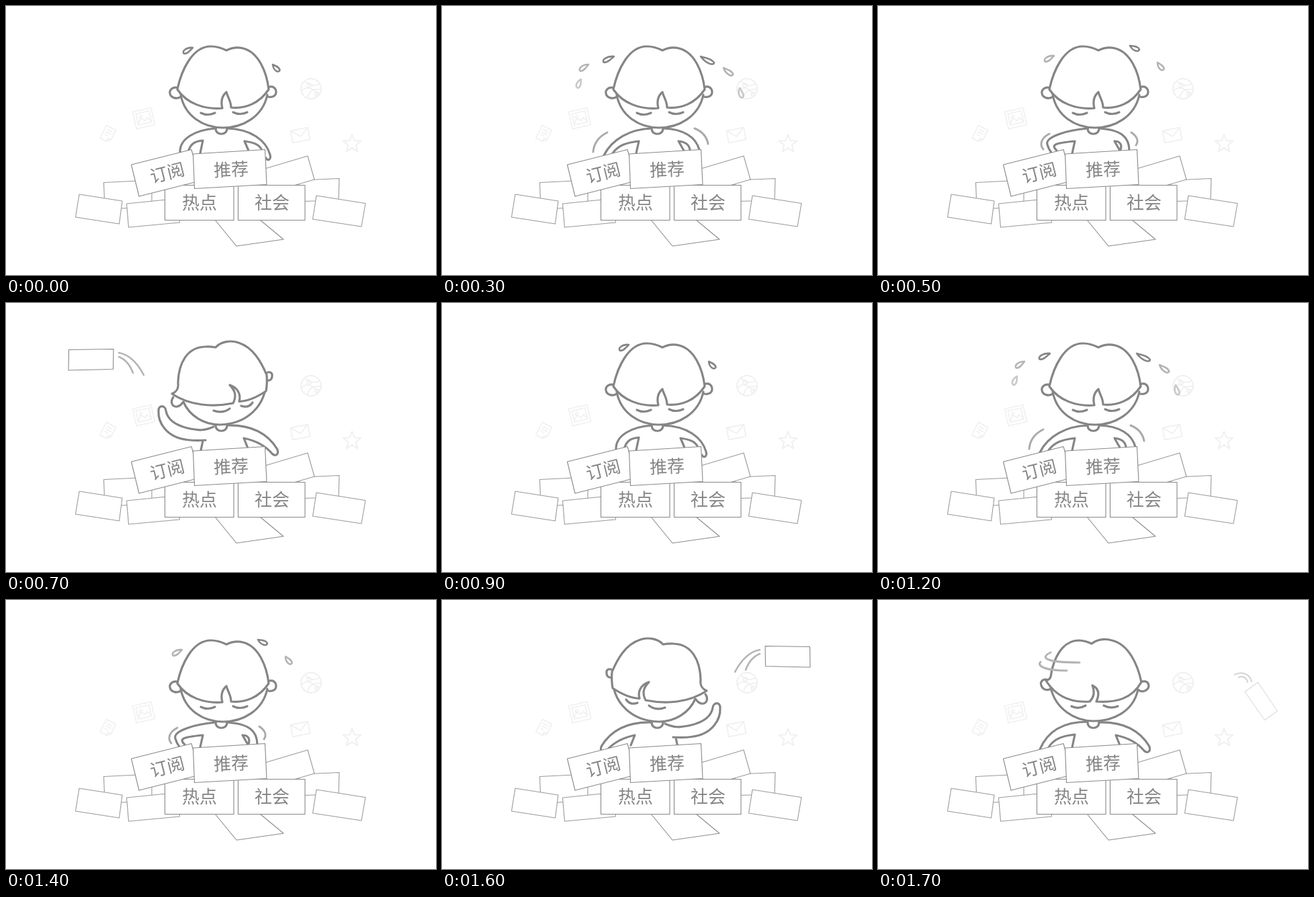
These frames come from a looping animation (640x400 px, 1800 ms). An HTML page with a canvas:

```html
<!DOCTYPE html>
<html lang="zh">
<head>
<meta charset="utf-8">
<title>信息堆</title>
<style>
html, body { margin: 0; width: 100%; height: 100%; overflow: hidden; background: #fff; }
canvas { display: block; width: 640px; height: 400px; }
</style>
</head>
<body>
<canvas id="stage" width="640" height="400"></canvas>
<script>
const ctx = document.getElementById('stage').getContext('2d');
const INK = '#858585', MID = '#b4b4b4', PALE = '#f0f0f0';
const STEP = 100, STEPS = 18;

function stroke(d, color = INK, width = 3.2, fill) {
  const path = new Path2D(d);
  if (fill) { ctx.fillStyle = fill; ctx.fill(path); }
  ctx.strokeStyle = color;
  ctx.lineWidth = width;
  ctx.stroke(path);
}

function at(x, y, degrees, draw) {
  ctx.save();
  ctx.translate(x, y);
  ctx.rotate(degrees * Math.PI / 180);
  draw();
  ctx.restore();
}

function mirrored(draw) {
  ctx.save();
  ctx.translate(641, 0);
  ctx.scale(-1, 1);
  draw();
  ctx.restore();
}

const card = (points, color = '#999') => stroke(`M${points}Z`, color, 1.1, '#fff');

function label(text, x, y, degrees = 0) {
  at(x, y, degrees, () => {
    ctx.fillStyle = '#858585';
    ctx.font = '300 26px "Noto Sans CJK SC", "Noto Sans CJK", sans-serif';
    ctx.textAlign = 'center';
    ctx.textBaseline = 'alphabetic';
    ctx.fillText(text, 0, 9.5);
  });
}

function icons() {
  at(205, 167, -13, () => {
    stroke('M-14 -13H14V13H-14Z M-10 -9H10V8H-10Z', PALE, 1.6);
    stroke('M-10 6L-4 -1L1 4L5 0L10 6 M-4 -5A2 2 0 1 0 -3.9 -5', PALE, 1.6);
  });
  at(152, 190, 27, () => {
    stroke('M-8 -10H8V6L3 11H-8Z M8 6H3V11', PALE, 1.6);
    stroke('M-4 -5H4M-4 -1H4M-4 3H1', PALE, 1.6);
  });
  at(438, 192, -11, () => stroke('M-13 -9H13V9H-13Z M-13 -9L0 2L13 -9', PALE, 1.8));
  at(454, 123, 0, () => {
    stroke('M15 0A15 15 0 1 1 -15 0A15 15 0 1 1 15 0', PALE, 2);
    stroke('M-9 -11C-2 -5 2 -3 13 -7 M-14 3C-7 -4 1 -3 11 10 M-5 14C-4 5 2 0 14 1', PALE, 1.8);
    stroke('M-3 -8A3 3 0 1 0 -2.9 -8 M9 5A3 3 0 1 0 9.1 5', PALE, 1.8);
  });
  at(515, 205, 0, () => {
    const points = Array.from({ length: 10 }, (_, i) => {
      const angle = i * Math.PI / 5 - Math.PI / 2, r = i % 2 ? 6 : 14;
      return `${r * Math.cos(angle)},${r * Math.sin(angle)}`;
    });
    stroke(`M${points.join(' ')}Z`, PALE, 2);
  });
}

function pile() {
  card('145.5,262.5 217,259 217,299 147,302');
  card('179.5,294 258,286 258.5,322 182.5,329');
  card('109,280 173,290 168.5,324 103.5,314');
  card('440,259 496,256.5 495,289 420,291');
  card('370,246.5 449,223 459,258 380,281');
  card('462,282 535,293.5 529,328 456.5,317');
  stroke('M311 318L343 357L413 347L378 318', '#8c8c8c', 1.1);
  card('236.5,266.5 339,266.5 339,318.5 236.5,318.5', '#888');
  card('345.5,266.5 445,266.5 445,318.5 345.5,318.5', '#888');
  card('186.5,236 276,213.5 289,260 198,283', '#888');
  card('278.5,220 385.5,213.5 388,265.5 280.5,271.5', '#888');
  label('订阅', 240, 248, -14);
  label('推荐', 335, 243, -2.5);
  label('热点', 288, 292);
  label('社会', 396, 292);
}

// Each head: ears, face, hair, eyes.
const heads = {
  front: [
    'M257 122C248 119 243 125 244 130C245 137 255 139 260 135M390 121C397 118 402 122 402 128C402 135 393 137 388 134',
    'M260 132C266 164 294 181 323 181C352 181 382 165 389 132',
    'M255 124C261 96 277 60 305 60C315 60 322 63 328 66C336 62 345 61 353 63C376 69 388 98 391 124C377 145 356 153 335 151C335 142 331 138 328 128C320 135 320 144 322 152C295 154 269 145 255 124Z',
    'M290 159Q300 164 311 159M338 158Q348 163 359 158'],
  turned: [
    'M249 140C244 147 247 155 255 154C259 153 261 151 263 148M388 104C393 101 397 104 396 109C396 114 392 116 388 115',
    'M264 147C273 168 295 181 318 181C356 180 388 156 388 110',
    'M247 135C256 131 257 125 256 118C257 90 269 66 296 65Q304 64.5 312 66C320 57 335 55 346 59C368 66 380 88 388 107Q389 120 387 131C372 141 359 146 347 146.5C350 136 345 126 333 122C342 131 343 139 338 149C308 155 274 153 247 135Z',
    'M309 160Q322 165 333 157M350 153Q361 157 367 148'],
  settling: [
    'M254 119C245 116 241 122 243 127C245 134 253 135 257 132M391 122C398 119 403 122 403 128C402 135 393 138 388 134',
    'M257 130C264 162 293 180 321 180C350 180 380 166 387 133',
    'M250 120C259 118 257 111 259 103C266 76 280 60 299 60Q309 60.5 318 65C326 59 337 57 348 60C374 66 387 98 392 122C378 147 354 153 325 151C329 142 330 132 319 127C323 137 321 145 315 151C288 153 266 145 250 120Z',
    'M288 158Q298 163 309 157M336 157Q346 162 357 158']
};

const hand = 'M329 182C362 181 388 192 403.5 217C407 225 401 229 396 224C386 212 373 205 354 201L360 216';
const bodies = {
  down: 'M312 182C284 184 258 196 259 218M271 217C275 203 283 201 293 200L289 219M329 182C365 183 387 200 393 221C395 229 389 231 387 226M355 201L361 215M355 201C369 203 378 206 381 215',
  bent: 'M312 182C285 184 248 194 252 206Q254 213 258 218M266 215C258 207 260 204 293 201L289 219M329 182C362 184 374 195 374 215M352 201L360 215M352 201C362 201 363 208 361 214',
  mid: 'M312 182C283 184 250 197 246 219M260 216C260 206 268 203 293 201L289 219M329 182C361 184 376 195 378 215M352 201L360 215M352 201C363 202 365 208 366 214',
  wide: 'M312 182C280 183 253 198 241 222M254 219C262 207 275 203 293 201L289 219M329 182C360 183 378 195 383 214M352 201L360 215M352 201C364 202 368 207 369 214',
  raised: 'M309 184C295 190 288 190 270 186C250 181 240 172 238 160C237 152 227 151 227 160C226 177 238 200 270 203.5Q282 205 297 204M293 205L290 219' + hand,
  released: 'M312 181C282 181 254 191 241 222M254 219C262 206 275 202 293 200L289 219' + hand
};

function person(body, head) {
  stroke(bodies[body]);
  stroke('M312 182C312 193 329 193 329 182');
  const [ears, face, hair, eyes] = heads[head];
  stroke(ears, INK, 3.2, '#fff');
  stroke(face, INK, 3.2, '#fff');
  stroke(hair, INK, 3.2, '#fff');
  stroke(eyes);
}

// Teardrop from its tail (x, y) to the far end of its bulb.
function drop(x, y, endX, endY, color = INK) {
  const length = Math.hypot(endX - x, endY - y);
  at(x, y, Math.atan2(endY - y, endX - x) * 180 / Math.PI, () =>
    stroke(`M0 0C${length * .4} -2 ${length * .7} -5 ${length} -2C${length + 2} 3 ${length * .5} 5 0 0Z`, color, 2.6));
}

function struggle(phase) {
  person(['down', 'bent', 'mid', 'wide'][phase], 'front');
  if (phase === 0) {
    drop(278, 62, 264, 69);
    drop(397, 87, 406, 97);
  } else if (phase === 1) {
    drop(262, 74, 248, 81, MID);
    drop(375, 59, 388, 66);
    drop(416, 84, 424, 95, MID);
    stroke('M255 190C243 196 240 206 246 213M377 188C386 194 388 201 384 207', '#aaa', 3);
  } else if (phase === 2) {
    drop(270, 69, 257, 75);
    drop(240, 80, 228, 87, MID);
    drop(380, 67, 395, 76);
    drop(421, 88, 431, 99, MID);
    stroke('M250 189C238 195 233 206 235 216M377 185C386 190 391 198 390 206', '#aaa', 3);
  } else {
    drop(256, 75, 240, 82);
    drop(218, 87, 205, 95, MID);
    drop(207, 109, 201, 121, '#c8c8c8');
    drop(385, 75, 404, 86);
    drop(419, 92, 432, 103, MID);
    drop(443, 122, 446, 136, '#c8c8c8');
    stroke('M246 188C234 194 226 204 225 217M376 182C386 186 394 194 396 205', '#aaa', 3);
  }
}

function throwLeft(phase, drift) {
  if (phase === 0) {
    person('raised', 'front');
    card('155.5,112 220,101 225,130 160,141');
  } else if (phase === 1) {
    person('raised', 'turned');
    card('93.5,69.5 160,68.5 159.5,98.5 93,100', '#888');
    stroke('M168 74C185 77 197 92 205 107M168 80C178 84 185 93 189 104', MID, 2.6);
  } else {
    mirrored(() => {
      person('released', 'settling');
      stroke('M257 78C240 86 250 93 300 93M242 92C236 98 248 105 281 105', MID, 3);
      ctx.translate(drift, 0);
      card('565.5,122.5 594.5,165 575.5,178.5 546,136.5', '#dcdcdc');
      stroke('M531 111C540 106 553 109 556 121M537 115C543 112 549 116 550 122', '#d8d8d8', 2.4);
    });
  }
}

function render(now) {
  const step = Math.floor(now / STEP) % STEPS;
  const beat = step % 9;
  ctx.fillStyle = '#fff';
  ctx.fillRect(0, 0, 640, 400);
  ctx.lineCap = ctx.lineJoin = 'round';
  icons();
  if (beat < 6) struggle(beat % 4);
  else if (step < 9) throwLeft(beat - 6, 24);
  else mirrored(() => throwLeft(beat - 6, 0));
  pile();
}

const start = performance.now();
function tick() {
  render(performance.now() - start);
  requestAnimationFrame(tick);
}
tick();
</script>
</body>
</html>
```
